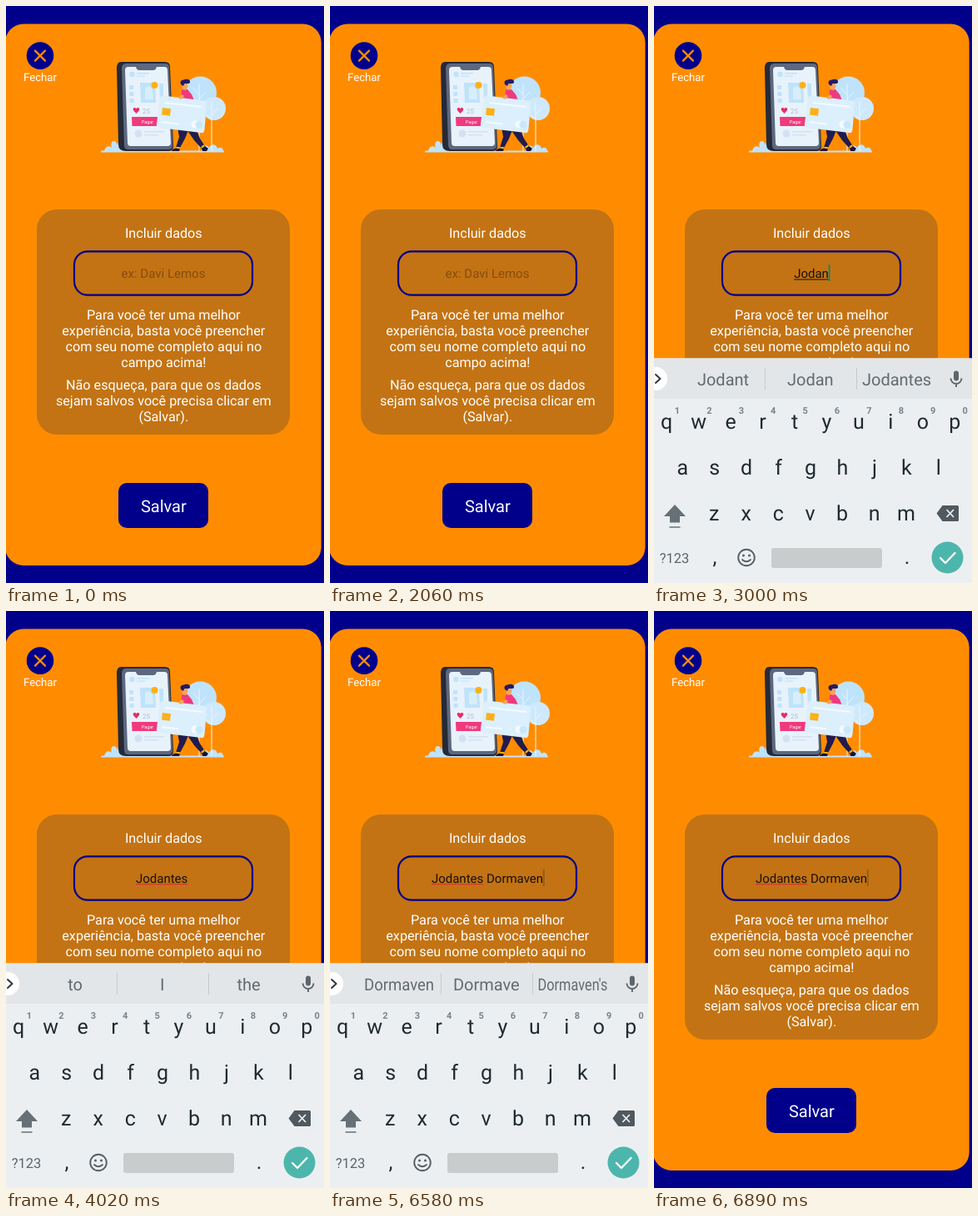
Animation, 382 px wide and 692 px high, one loop 8000 ms. Source, as an HTML page:

```html
<!DOCTYPE html>
<html lang="pt-BR">
<head>
<meta charset="utf-8">
<title>Incluir dados</title>
<style>
  html, body { margin: 0; width: 100%; height: 100%; overflow: hidden; background: #00008b; }
  svg { display: block; width: 382px; height: 692px; }
  text { font-family: Roboto, "Noto Sans", sans-serif; white-space: pre; text-rendering: geometricPrecision; }
  .mid { text-anchor: middle; }
  .white { fill: #fff; font-size: 16.2px; }
  .field { font-size: 15px; }
  .key { font-size: 25px; fill: #1f2b31; }
  .digit { font-size: 11px; font-weight: 700; fill: #78838a; }
  .word { font-size: 20px; fill: #616b71; }
  .line { fill: none; stroke-linecap: round; stroke-linejoin: round; }
</style>
</head>
<body>
<svg viewBox="0 0 382 692">
  <rect width="382" height="692" fill="#00008b"/>
  <rect x="-1" y="21.600" width="379.700" height="649.400" rx="22" fill="#ff8c00"/>

  <circle cx="41" cy="59.600" r="16.300" fill="#00008b"/>
  <path d="M35 53.600l12 12m0-12l-12 12" class="line" stroke="#ff8c00" stroke-width="2.200"/>
  <text x="41" y="90.300" class="mid" font-size="13.200" fill="#fff">Fechar</text>

  <g id="art">
    <g fill="#bfe3fb">
      <circle cx="233.500" cy="104" r="19.500"/>
      <circle cx="250" cy="123" r="14" fill="#cfe9fc"/>
      <path d="M118 174c1-6 6-7 9-4c-3-9 5-11 7-3c1-9 8-9 9 0c4-5 9-1 8 7z"/>
      <path d="M235 174c1-7 6-9 9-4c3-6 9-4 10 1c4-3 7 0 7 3z"/>
      <rect x="114" y="173.400" width="148" height="2" rx="1"/>
    </g>
    <path d="M232 94v80m0-62l8-9m-8 3l-7-7M247 115v59m0-44l7-7m-7 13l-5-5" class="line" stroke="#eaf6ff" stroke-width="1"/>

    <path d="M138 67h53q6 0 6 6l4 95q0 6-6 6h-51q-9 0-9-8l-2-91q0-8 5-8z" fill="#252a38"/>
    <path d="M144 69h47q5 0 5 5l4 93q0 5-5 5h-48q-5 0-5-5l-3-92q0-6 5-6z" fill="#5d6880"/>
    <path d="M147 73h9q1 4 4 4h17q3 0 4-4h9q4 0 4 4l4 87q0 4-4 4h-44q-4 0-4-4l-3-87q0-4 4-4z" fill="#e8f2fb"/>
    <g fill="#bfe3fb">
      <circle cx="151.500" cy="82" r="3.200"/>
      <path d="M157 80h15v1.500h-15zM157 83.500h10v1.300h-10z"/>
      <path d="M161 92h18l1 24h-18z"/>
      <path d="M148 95h5v5h-5zM148.300 103h5v5h-5zM148.600 111h5v5h-5zM184 93h5v22h-4z"/>
      <circle cx="159" cy="153" r="4.500" fill="#d2e2f2"/>
      <path d="M166 150h24v1.600h-24zM166 154h17v1.600h-17z" fill="#d2e2f2"/>
    </g>
    <path d="M167 98l5-2l4 4l1 12h-10z" fill="#d8eefd"/>
    <circle cx="178.500" cy="95" r="4" fill="#fbb117"/>
    <path d="M156.500 129l-3.200-3.400c-2-3 2-5 3.200-2c1.200-3 5.200-1 3.200 2z" fill="#e52d68"/>
    <text x="164" y="129" font-size="8" fill="#b3bdcb">25</text>
    <path d="M151 133h36l.5 11h-36z" fill="#f03a7c"/>
    <text x="170" y="141" class="mid" font-size="5.500" fill="#fff">Pagar</text>

    <path d="M206 145l15-1l-6 15l-6 11h-5l4-13zM215 145l13 1l5 13l6 9l-4 3l-9-10z" fill="#211c4d"/>
    <path d="M204 169h5l-1 3h-5zM234 169l4-3l1 3l-3 2z" fill="#fbb117"/>
    <path d="M208 174h-9q0-2 5-3.500l5 1zM236 174l-1-3l4-3l4 3l-2 3z" fill="#17133a"/>
    <path d="M211 101q3-3 7-1l5 6l3 7l-1 4l-15-3z" fill="#f03a7c"/>
    <path d="M211 92h7l.5 5l-2.500 4l-4-1z" fill="#f5a55f"/>
    <path d="M210 94q-2-5 3.500-5.500q4-1.500 7 .5q1.500 3-1 4h-5l-1.500 3z" fill="#211c6b"/>
    <path d="M189 107.500l49 6q3.500.5 3.200 4l-2.800 31q-.4 4-4 3.600l-50-6q-4-.5-3.500-4l4-31q.6-4 4.100-3.600z" fill="#dceffc"/>
    <path d="M191 116l45 5M187 139l20 2.400" stroke="#f4faff" stroke-width="2"/>
    <path d="M188 122l10 1.200l-1 8.500l-10-1.200z" fill="#fbb117"/>
    <circle cx="227" cy="142" r="4.500" fill="#f4faff"/>
    <circle cx="232" cy="142.500" r="4.500" fill="#c9e7fb"/>
    <path d="M211 106l-4 4.500l4 1.500l3-4z" fill="#f5a55f"/>
  </g>

  <rect x="37" y="244" width="304" height="270" rx="24" fill="#c37313"/>
  <rect x="82" y="294.400" width="214" height="52.200" rx="16" fill="none" stroke="#00008b" stroke-width="2.200"/>
  <text x="189.300" y="278" class="mid white">Incluir dados</text>
  <g id="copy"></g>
  <rect x="135" y="572" width="108" height="54" rx="10" fill="#00008b"/>
  <text x="189.300" y="607" class="mid" font-size="20" fill="#fff">Salvar</text>

  <text id="hint" x="189" y="326" class="mid field" fill="#864d10">ex: Davi Lemos</text>
  <text id="value" y="326" class="field" fill="#171006"></text>
  <rect id="typo" y="327" height="1.200" fill="#d8342c"/>
  <rect id="compose" y="327.500" height="1" fill="#171006"/>
  <rect id="caret" y="310" width="1.800" height="20"/>

  <g id="board">
    <rect y="422.500" width="382" height="300" fill="#eceff1"/>
    <rect y="422.500" width="382" height="48.500" fill="#e3e6e8"/>
    <path d="M133.500 434v26m110-26v26" stroke="#c6cbce"/>
    <circle cx="2" cy="447" r="14" fill="#fff"/>
    <path d="M2 442l5.500 5l-5.500 5" class="line" stroke="#2c373d" stroke-width="2"/>
    <rect x="360" y="437.500" width="6" height="12" rx="3" fill="#5c666c"/>
    <path d="M356.500 446.500a6.500 6.500 0 0 0 13 0M363 453v4" fill="none" stroke="#5c666c" stroke-width="1.900"/>
    <g id="words"></g>
    <g id="keys"></g>
    <path d="M25 598l13 14h-7v7.500h-12v-7.500h-7z" fill="#667076"/>
    <path d="M18.500 625h13" stroke="#667076" stroke-width="1.500"/>
    <path d="M339.500 608.500l7-9.500h18q1.500 0 1.500 1.500v16q0 1.500-1.500 1.500h-18z" fill="#50595f"/>
    <path d="M351.500 604l8.500 9m0-9l-8.500 9" stroke="#eceff1" stroke-width="1.800"/>
    <text x="24.500" y="668" class="mid" font-size="16.500" fill="#5a646a">?123</text>
    <text x="73" y="669" class="mid key">,</text>
    <text x="304" y="669" class="mid key">.</text>
    <g fill="#566066">
      <circle cx="111" cy="661.500" r="9.800" fill="none" stroke="#566066" stroke-width="1.900"/>
      <circle cx="107.500" cy="659" r="1.500"/>
      <circle cx="114.500" cy="659" r="1.500"/>
      <path d="M106 664q5 4.500 10 0" class="line" stroke="#566066" stroke-width="1.800"/>
    </g>
    <rect x="141" y="650" width="133" height="24" rx="3" fill="#c9cccd"/>
    <circle cx="352.500" cy="661.500" r="19" fill="#4db6ac"/>
    <path d="M344 662l6 6l11.500-12" class="line" stroke="#fff" stroke-width="2.300"/>
  </g>
</svg>
<script>
const LOOP = 8000, MID = 189;
const $ = id => document.getElementById(id);
const pen = document.createElement('canvas').getContext('2d');

function widthOf(text, size) {
  pen.font = `${size}px Roboto, "Noto Sans", sans-serif`;
  return pen.measureText(text).width;
}

function addText(parent, x, y, cls, text) {
  const node = document.createElementNS('http://www.w3.org/2000/svg', 'text');
  node.setAttribute('x', x);
  node.setAttribute('y', y);
  node.setAttribute('class', 'mid ' + cls);
  node.textContent = text;
  return parent.appendChild(node);
}

function setBar(bar, x, width) {
  bar.setAttribute('x', x);
  bar.setAttribute('width', Math.max(0, width));
}

function addLines(y, lines) {
  lines.forEach((line, i) => addText($('copy'), 189.3, y + 19 * i, 'white', line));
}

addLines(375.7, ['Para você ter uma melhor', 'experiência, basta você preencher',
  'com seu nome completo aqui no', 'campo acima!']);
addLines(460.2, ['Não esqueça, para que os dados',
  'sejam salvos você precisa clicar em', '(Salvar).']);

['qwertyuiop', 'asdfghjkl', 'zxcvbnm'].forEach((row, r) =>
  [...row].forEach((ch, i) =>
    addText($('keys'), [15.2, 34.2, 72.3][r] + 38.45 * i, 506.5 + 55 * r, 'key', ch)));
[...'1234567890'].forEach((n, i) => addText($('keys'), 28 + 38.4 * i, 489, 'digit', n));
const slots = [83, 187.8, 291.5].map(x => ({ x, node: addText($('words'), 0, 455, 'word', '') }));

// time, typed text, keyboard suggestions
const typing = [
  [0, '', '||'],
  [2210, 'J', 'Jo|Just|J'],
  [2440, 'Jo', 'Joy|Jo|Job'],
  [2590, 'Jod', 'Jode|Jod|Jodantes'],
  [2760, 'Joda', 'Jodan|Joda|Jodantes'],
  [2910, 'Jodan', 'Jodant|Jodan|Jodantes'],
  [3070, 'Jodant', 'Jodante|Jodant|Jodantes'],
  [3390, 'Jodante', 'Jodantes|Jodante|Jodantes\'s'],
  [3560, 'Jodantes', 'Jodantes|Jodante|Jodantes\'s'],
  [4020, 'Jodantes ', 'to|I|the'],
  [4170, 'Jodantes D', 'Do|Did|Day'],
  [4320, 'Jodantes Do', 'Dog|Do|Doing'],
  [4400, 'Jodantes Dor', 'Dorm|Dor|Dormant'],
  [4550, 'Jodantes Dorm', 'Dorm|Dorms|Dormant'],
  [4630, 'Jodantes Dorma', 'Dorma|Dormant|Dormancy'],
  [4800, 'Jodantes Dormav', 'Dormav|Dormaven|Dormaven\'s'],
  [4870, 'Jodantes Dormave', 'Dormave|Dormaven|Dormaven\'s'],
  [5040, 'Jodantes Dormaven', 'Dormaven|Dormave|Dormaven\'s']
];
// time, keyboard opacity, drop
const slide = [[0, 0, 0], [2130, .6, 8], [2210, .95, 2], [2290, 1, 0],
  [6660, .95, 4], [6740, .81, 11], [6810, .4, 20], [6890, 0, 0]];
// time, caret colour
const TEAL = '#0b8a78', OFF = 'none';
const blink = [[0, OFF], [500, TEAL], [1050, OFF], [1510, TEAL], [2060, OFF], [2210, TEAL],
  [4020, OFF], [4100, TEAL], [5570, OFF], [6050, TEAL], [6580, '#94591a']];

const at = (list, t) => list.findLast(step => step[0] <= t);

function draw(t) {
  const [, typed, hints] = at(typing, t);
  const [, alpha, drop] = at(slide, t);
  const width = widthOf(typed, 15), left = MID - width / 2;
  const space = typed.indexOf(' ');

  $('hint').style.display = typed ? 'none' : '';
  $('value').textContent = typed;
  $('value').setAttribute('x', left);
  setBar($('typo'), left, space < 0 ? 0 : widthOf(typed.slice(0, space), 15));
  const start = widthOf(typed.slice(0, space + 1), 15);
  setBar($('compose'), left + start, t < 6580 ? width - start : 0);
  $('caret').setAttribute('x', left + width - .2);
  $('caret').setAttribute('fill', at(blink, t)[1]);

  // long suggestions condense to their column
  hints.split('|').forEach((word, i) => {
    const { x, node } = slots[i];
    const fit = Math.min(1, 84 / (widthOf(word, 20) || 1));
    node.textContent = word;
    node.setAttribute('transform', `translate(${x} 0) scale(${fit} 1)`);
  });
  $('board').setAttribute('opacity', alpha);
  $('board').setAttribute('transform', `translate(0 ${drop})`);
}

const begin = performance.now();
function tick() {
  draw((performance.now() - begin) % LOOP);
  requestAnimationFrame(tick);
}
tick();
</script>
</body>
</html>
```
